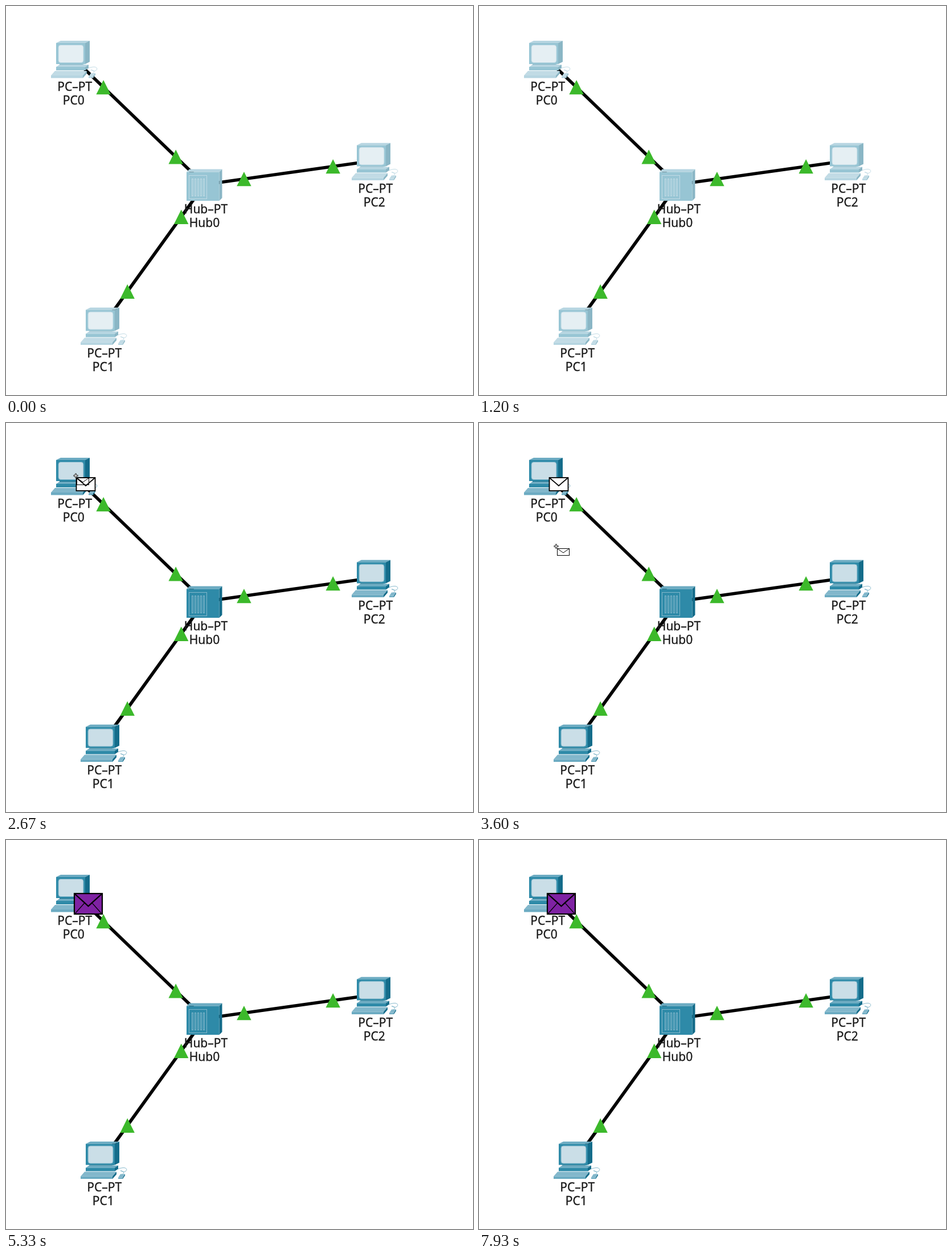
An HTML page with a canvas that plays this animation: 820 px wide and 683 px high, repeating every 8000 ms.

```html
<!DOCTYPE html>
<html lang="en">
<head>
<meta charset="utf-8">
<title>Hub network</title>
<style>
  html, body { margin: 0; width: 100%; height: 100%; overflow: hidden; background: #fff; }
  canvas { display: block; width: 820px; height: 683px; }
</style>
</head>
<body>
<canvas id="stage"></canvas>
<script>
const W = 820, H = 683, LOOP = 8000;
const POINTER_IN = 1800;  // pointer appears over the first computer
const ACTIVE = 2670;      // devices gain full colour, first envelope placed
const SENT = 4870;        // packet becomes purple, pointer leaves
const INK = '#000';

const canvas = document.getElementById('stage');
const ctx = canvas.getContext('2d');
const dpr = window.devicePixelRatio || 1;
canvas.width = W * dpr;
canvas.height = H * dpr;

// Device centres
const hub = { x: 348.6, y: 313.4 };
const pcs = [
  { x: 118.5, y: 92, name: 'PC0' },
  { x: 170.5, y: 560.5, name: 'PC1' },
  { x: 646.5, y: 271.5, name: 'PC2' }
];

// Teal shades by lightness; idle devices are half faded to white
function palette(active) {
  const shade = (r, g, b) => {
    const mix = v => active ? v : (v + 255) / 2;
    return `rgb(${mix(r)}, ${mix(g)}, ${mix(b)})`;
  };
  return {
    side: shade(20, 108, 138),
    front: shade(46, 138, 168),
    top: shade(108, 171, 194),
    pale: shade(130, 183, 203),
    screen: shade(202, 222, 231)
  };
}

const lerp = (a, b, p) => a + (b - a) * p;

function glide(t, from, to) {
  const p = Math.min(1, Math.max(0, (t - from) / (to - from)));
  return p * p * (3 - 2 * p);
}

function trace(points) {
  ctx.beginPath();
  for (const [x, y] of points) ctx.lineTo(x, y);
}

function poly(color, ...points) {
  trace(points);
  ctx.fillStyle = color;
  ctx.fill();
}

function line(color, width, ...points) {
  trace(points);
  ctx.strokeStyle = color;
  ctx.lineWidth = width;
  ctx.stroke();
}

// Oblique box: front rectangle plus top and right faces
function box(x, y, w, h, dx, dy, top, front, side) {
  const r = x + w, b = y + h;
  poly(top, [x, y], [x + dx, y - dy], [r + dx, y - dy], [r, y]);
  poly(side, [r, y], [r + dx, y - dy], [r + dx, b - dy], [r, b]);
  poly(front, [x, y], [r, y], [r, b], [x, b]);
}

function label(text, x, middle) {
  ctx.font = '21px "Noto Sans", "Open Sans", sans-serif';
  ctx.textAlign = 'center';
  ctx.textBaseline = 'alphabetic';
  ctx.fillStyle = ctx.strokeStyle = '#1c1c1c';
  ctx.lineWidth = 0.35;
  ctx.fillText(text, x, middle + 7.5);
  ctx.strokeText(text, x, middle + 7.5);
}

function drawPC(pc, c) {
  ctx.save();
  ctx.translate(pc.x - 39.5, pc.y - 32);

  // mouse cable
  ctx.beginPath();
  ctx.moveTo(66, 49);
  ctx.bezierCurveTo(88, 41, 82, 60, 70, 52);
  ctx.quadraticCurveTo(80, 54, 73, 59);
  ctx.strokeStyle = c.pale;
  ctx.lineWidth = 1;
  ctx.stroke();

  box(9, 47, 51, 6, 6, 4, c.top, c.front, c.side);
  box(15, 42, 40, 1, 4, 1, c.side, c.side, c.side);
  box(9, 5, 51, 37, 8, 4, c.top, c.front, c.side);
  ctx.beginPath();
  ctx.roundRect(13, 8.5, 44, 31, 4);
  ctx.fillStyle = c.screen;
  ctx.fill();
  ctx.strokeStyle = c.top;
  ctx.stroke();
  box(0, 62, 56, 4.5, 7, 8, c.pale, c.top, c.side);
  box(66, 64, 8, 2.5, 4, 6, c.pale, c.top, c.side);
  ctx.restore();

  label('PC–PT', pc.x + 2.3, pc.y + 49);
  label(pc.name, pc.x + 0.3, pc.y + 73);
}

function drawHub(c) {
  box(317, 291.5, 57.5, 50.5, 5, 5, c.top, c.front, c.side);
  ctx.strokeStyle = c.pale;
  ctx.lineWidth = 1;
  ctx.strokeRect(321.5, 297.5, 31, 41);
  for (let x = 326.5; x < 350; x += 5) ctx.strokeRect(x, 303.5, 2, 30);
  label('Hub–PT', 351, 356);
  label('Hub0', 348.5, 380);
}

// Status light on the way from one device to another
function drawLight(from, to, distance) {
  const p = distance / Math.hypot(to.x - from.x, to.y - from.y);
  const x = lerp(from.x, to.x, p), y = lerp(from.y, to.y, p), r = 12.7;
  poly('#3cb92b', [x, y - r], [x + r, y + r], [x - r, y + r]);
}

function envelope(x, y, w, h, fill, width) {
  ctx.fillStyle = fill;
  ctx.fillRect(x, y, w, h);
  ctx.strokeStyle = INK;
  ctx.lineWidth = width;
  ctx.strokeRect(x, y, w, h);
  line(INK, width, [x, y], [x + w * 0.36, y + h * 0.44],
    [x + w / 2, y + h * 0.62], [x + w * 0.64, y + h * 0.44], [x + w, y]);
}

function drawPacket(t) {
  if (t < ACTIVE) return;
  if (t < SENT) {
    envelope(123.5, 96, 33, 23, '#fff', 1.8);
    return;
  }
  envelope(120, 94, 49, 36, '#7f22a3', 2.2);
  for (const side of [-1, 1]) {
    line(INK, 1.2, [144.5 + side * 24, 130], [144.5 + side * 7, 111]);
  }
}

function drawPointer(t) {
  if (t < POINTER_IN || t >= SENT) return;
  const settle = glide(t, 2070, 2600), travel = glide(t, 3200, 4400);
  const x = lerp(lerp(130, 122, settle), 173, travel);
  const y = lerp(lerp(88, 92, settle), 567, travel);
  ctx.save();
  ctx.translate(Math.round(x) + 0.5, Math.round(y) + 0.5);
  for (const [color, arm, width] of [['#333', 4, 3], ['#fff', 3, 1]]) {
    line(color, width, [-arm, 0], [arm, 0]);
    line(color, width, [0, -arm], [0, arm]);
  }
  envelope(2, 4, 21, 12, 'transparent', 1);
  ctx.restore();
}

function draw(t) {
  const c = palette(t >= ACTIVE);
  ctx.setTransform(dpr, 0, 0, dpr, 0, 0);
  ctx.fillStyle = '#fff';
  ctx.fillRect(0, 0, W, H);
  for (const pc of pcs) line(INK, 5.6, [pc.x, pc.y], [hub.x, hub.y]);
  for (const pc of pcs) drawPC(pc, c);
  drawHub(c);
  drawPacket(t);
  for (const pc of pcs) {
    drawLight(pc, hub, 73);
    drawLight(hub, pc, 70);
  }
  drawPointer(t);
}

const start = performance.now();
function tick() {
  draw((performance.now() - start) % LOOP);
  requestAnimationFrame(tick);
}
tick();
</script>
</body>
</html>
```
